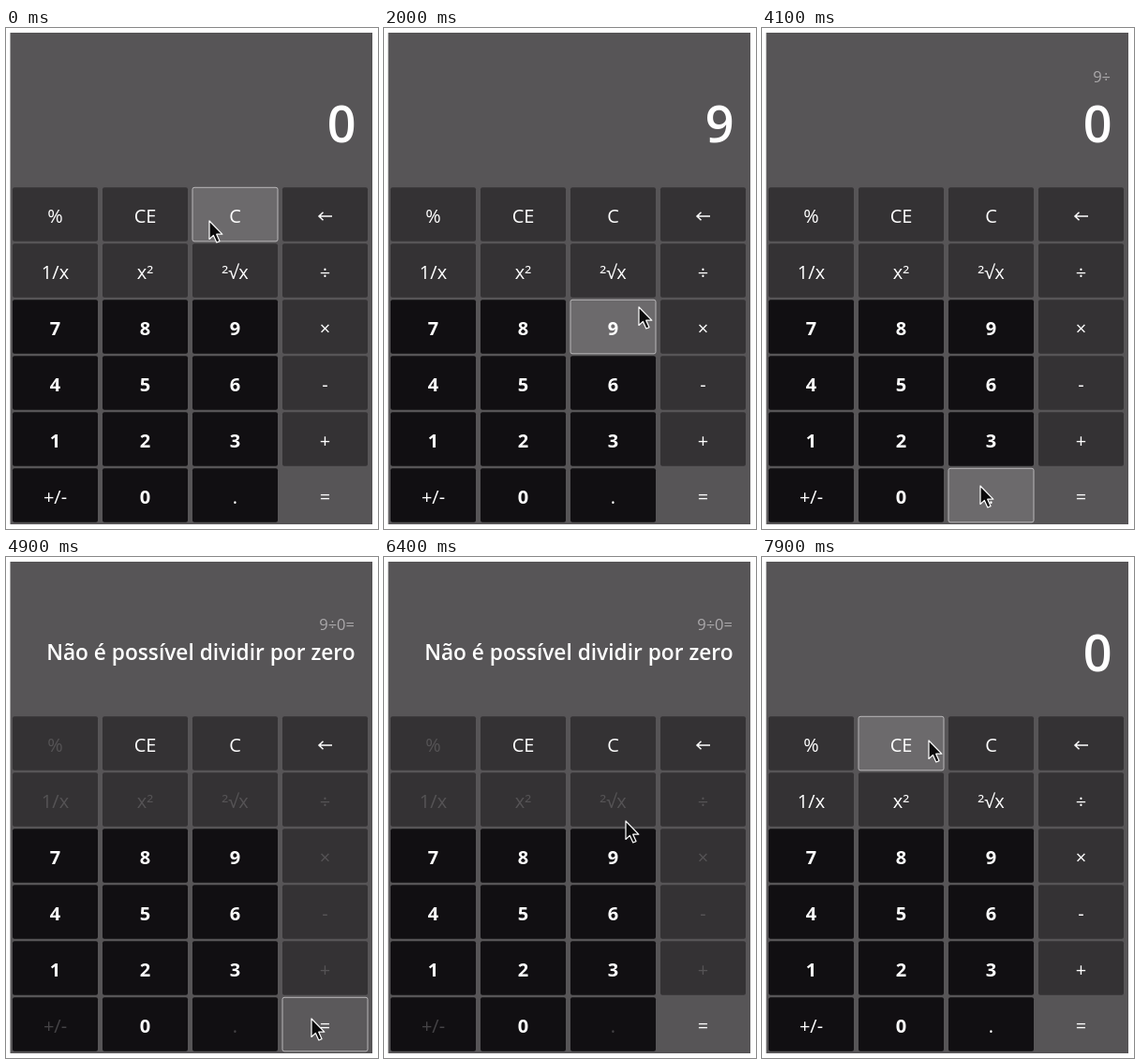
Recreate the animation shown at these times as an HTML page. Size 397 by 535 pixels, loop 8 s.

```html
<!DOCTYPE html>
<html lang="pt">
<head>
<meta charset="utf-8">
<title>Calculadora</title>
<style>
html, body { margin: 0; width: 100%; height: 100%; overflow: hidden; background: #fff; }
svg { display: block; width: 100%; height: 100%; }
text { font-family: "Open Sans", "Noto Sans", "DejaVu Sans", sans-serif; fill: #fff; }
.key { font-size: 20px; text-anchor: middle; }
.digit { font-weight: 700; }
#sum, #out { text-anchor: end; }
#sum { font-size: 16.5px; fill: #acaaac; }
#out { font-weight: 600; }
</style>
</head>
<body>
<svg id="stage" viewBox="0 0 397 535">
  <rect x="4.5" y="5" width="386.5" height="525" fill="#575557"/>
  <text id="sum" x="372"></text>
  <text id="out"></text>
  <g id="keys"></g>
  <path id="cursor" d="M0 0V19.5L4.4 15.4L7.8 23L11 21.6L7.7 14.2H13.8Z" fill="#0b0a0b" stroke="#fff" stroke-width="1.2" stroke-linejoin="round"/>
</svg>
<script>
const LOOP = 8000, STEP = 100;
const LABELS = ['%', 'CE', 'C', '←', '1/x', 'x²', '²√x', '÷', '7', '8', '9', '×',
  '4', '5', '6', '-', '1', '2', '3', '+', '+/-', '0', '.', '='];
const KEY_W = 91, KEY_H = 57.5;

// Time, x, y of the pointer tip
const PATH = [
  [0, 217, 206], [300, 217, 206], [400, 224, 228], [500, 240, 280], [600, 254, 312],
  [1900, 254, 312], [2000, 272, 298], [2100, 322, 263],
  [3000, 322, 263], [3200, 231, 376], [3400, 152, 490],
  [3900, 152, 490], [4000, 180, 490], [4100, 233, 489], [4300, 326, 493],
  [6100, 326, 493], [6400, 258, 282], [6600, 191, 210], [6700, 178, 196], [LOOP, 178, 196]
];

// Start time, result, expression, error
const STATES = [
  [0, '0', ''], [1000, '9', ''], [2500, '9', '9÷'], [3700, '0', '9÷'],
  [4600, 'Não é possível dividir por zero', '9÷0=', true], [7700, '0', '']
];

const $ = id => document.getElementById(id);

function add(parent, tag, attrs) {
  const el = document.createElementNS('http://www.w3.org/2000/svg', tag);
  set(el, attrs);
  return parent.appendChild(el);
}

function set(el, attrs) {
  for (const name in attrs) el.setAttribute(name, attrs[name]);
}

function makeKey(label, i) {
  const x = 7 + i % 4 * 96, y = 170.3 + Math.floor(i / 4) * 60;
  const digit = /^\d$/.test(label), equals = label === '=';
  const dark = digit || label === '.' || label === '+/-';
  const box = add($('keys'), 'rect', { x, y, width: KEY_W, height: KEY_H, rx: 2 });
  let face;
  if (label === '←') {
    face = add($('keys'), 'path', {
      d: 'M348 201H334M338.5 196.8L334 201L338.5 205.2',
      fill: 'none', stroke: '#fff', 'stroke-width': 1.5
    });
  } else {
    face = add($('keys'), 'text', {
      x: x + KEY_W / 2, y: y + 37.2, class: digit ? 'key digit' : 'key'
    });
    face.textContent = label;
  }
  return {
    x, y, box, face,
    fill: equals ? '#575557' : dark ? '#110f12' : '#343234',
    hover: equals ? '#5b595b' : '#6c6a6c',
    faded: dark ? '#454346' : '#555355',
    locks: !digit && !['CE', 'C', '←', '='].includes(label)
  };
}

const keys = LABELS.map(makeKey);

function pointer(t) {
  const i = PATH.findIndex(p => p[0] > t);
  const [t0, x0, y0] = PATH[i - 1], [t1, x1, y1] = PATH[i];
  const k = (t - t0) / (t1 - t0);
  return [x0 + (x1 - x0) * k, y0 + (y1 - y0) * k];
}

function render(time) {
  const t = Math.floor(time % LOOP / STEP) * STEP;
  const [px, py] = pointer(t);
  const [, result, expr, error] = STATES.filter(s => s[0] <= t).pop();

  $('sum').textContent = expr;
  set($('sum'), { y: error ? 77.5 : 57.5 });
  $('out').textContent = result;
  set($('out'), error
    ? { x: 372.5, y: 109.5, 'font-size': 22.7 }
    : { x: 373.5, y: 122, 'font-size': 54 });

  for (const k of keys) {
    const off = error && k.locks;
    const over = !off && px >= k.x && px <= k.x + KEY_W && py >= k.y && py <= k.y + KEY_H;
    set(k.box, { fill: over ? k.hover : k.fill, stroke: over ? '#b9b7b9' : 'none' });
    k.face.style.fill = k.face.tagName === 'text' ? (off ? k.faded : '#fff') : 'none';
  }
  set($('cursor'), { transform: `translate(${px} ${py})` });
}

const start = performance.now();
function tick() {
  render(performance.now() - start);
  requestAnimationFrame(tick);
}
tick();
</script>
</body>
</html>
```
